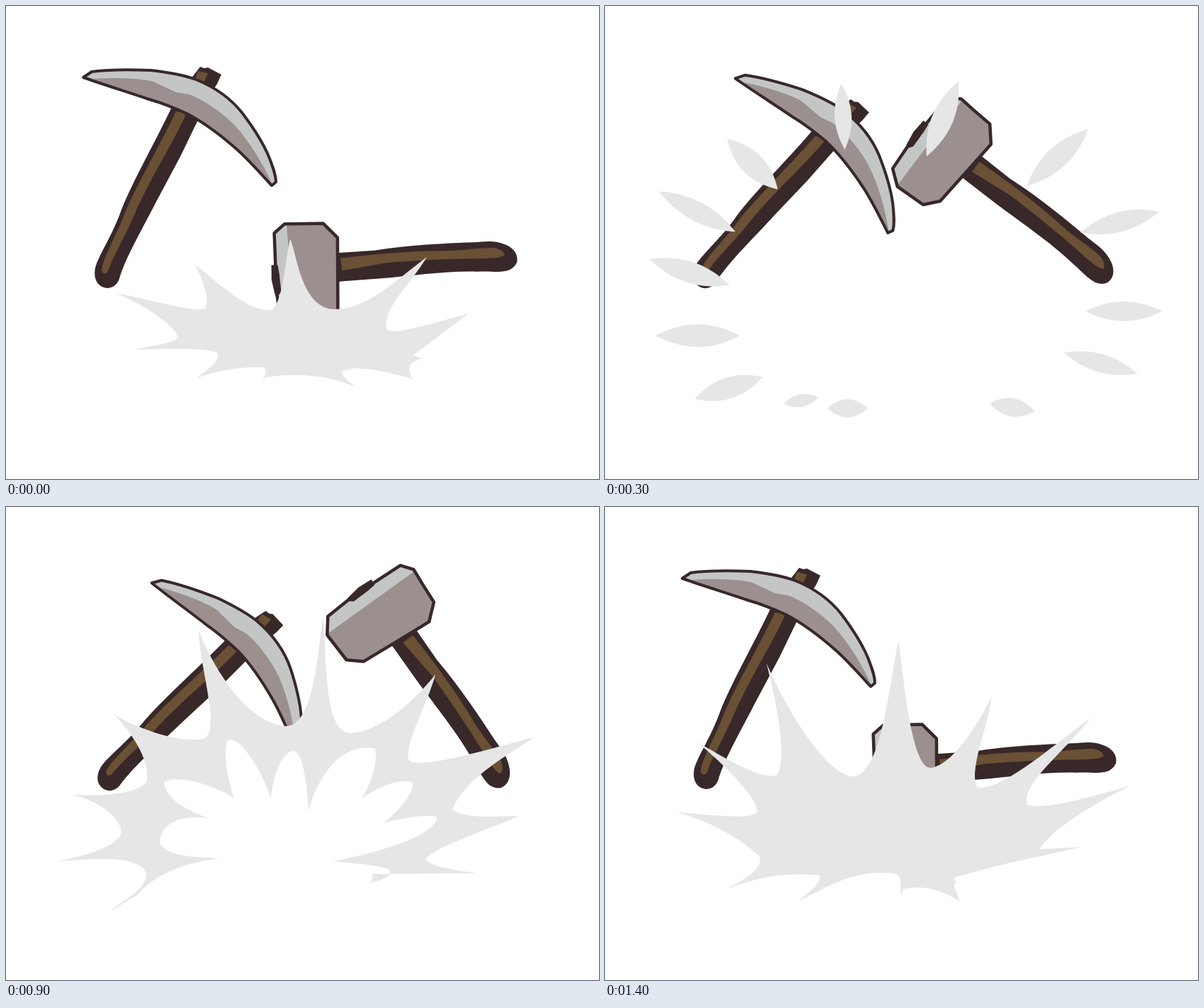
An HTML page with a canvas that plays this animation: 837x669 px, repeating every 1500 ms.

```html
<!DOCTYPE html>
<html lang="en">
<head>
<meta charset="utf-8">
<title>Pickaxe and hammer</title>
<style>
html, body { margin: 0; width: 100%; height: 100%; overflow: hidden; background: #fff; }
canvas { display: block; }
</style>
</head>
<body>
<canvas id="stage" width="837" height="669"></canvas>
<script>
const ctx = document.getElementById('stage').getContext('2d');
const DARK = '#38282a', WOOD = '#6a5034', LIGHT = '#c4c6c6', SHADE = '#9b8f8f', DUST = '#e6e6e6';
const LOOP = 1500, STEP = 100, HALF = 700;
const rad = degrees => degrees * Math.PI / 180;
const shape = d => new Path2D(d);

const pick = {
  handle: shape('M238 134 C215 185 180 245 163 288 C150 325 132 350 126 370 C122 391 134 399 144 399 C154 398 159 391 161 382 C172 350 190 320 213 275 L246 213 L274 155Z'),
  grain: shape('M240 149 L255 151 C236 194 203 244 180 298 C162 338 153 350 144 375 Q139 382 135 375 C136 358 152 332 165 300 C180 260 214 204 240 149Z'),
  knob: shape('M274 86 L280 88 L285 87 L304 97 L298 110 L291 121 L261 103Z'),
  knobGrain: shape('M271 92 L285 95 L278 112 L266 105Z'),
  head: shape('M109 101 L121 93 C150 89 180 90 205 91 C230 94 250 97 268 104 C298 116 320 134 334 152 C352 176 363 194 371 213 C378 231 381 240 381 249 L375 254 C357 234 342 217 325 202 C300 180 280 165 255 152 C235 143 220 137 202 132 C170 121 140 112 109 101Z'),
  shade: shape('M122 103 Q180 100 208 107 L240 122 L258 125 C276 131 305 150 323 169 C345 193 362 222 376 252 C357 234 342 217 325 202 C300 180 280 165 255 152 C235 143 220 137 202 132Z')
};

const hammer = {
  handle: shape('M550 160 L590 233 C612 272 640 316 655 353 C662 367 664 377 673 390 Q680 398 690 398 Q705 394 706 375 C706 356 698 345 690 330 C672 294 650 250 622 208 L590 148Z'),
  grain: shape('M577 178 L592 169 C620 214 642 254 661 295 C673 323 690 345 696 363 Q697 375 692 378 C685 374 681 364 674 350 C658 314 633 266 613 230Z'),
  head: shape('M476 129 L509 108 L546 89 L586 69 L604 77 L614 99 L627 126 L617 153 L580 170 L519 198 L495 193 L472 155Z'),
  light: shape('M476 129 L586 69 L604 77 L602 81 L475 152Z'),
  lug: shape('M507 106 L524 93 L543 84 L547 92 L537 99 L515 112 L508 111Z')
};

const burst = {
  spark: shape('M401 330 C410 344 415 427 463 429 C510 429 550 388 594 355 C568 398 532 426 537 457 C545 466 590 452 653 435 L575 494 L588 499 C563 504 568 518 575 528 C540 518 490 505 474 518 C475 525 485 531 495 540 C460 524 420 518 367 525 L361 531 C369 520 368 510 360 511 C330 510 300 515 270 526 C285 513 304 503 298 490 C280 483 220 485 180 486 C210 480 240 477 243 467 C235 453 210 430 155 406 C210 416 271 436 282 427 C287 410 278 390 267 366 C305 395 340 432 375 430 C392 415 392 370 401 330Z'),
  blast: shape('M414 189 C421 230 431 370 460 369 C490 365 525 310 546 268 C541 310 512 375 526 397 C565 400 640 330 685 299 C655 340 586 392 596 421 C620 430 690 408 740 395 C700 415 636 450 613 484 L672 481 C620 493 550 506 492 525 L496 531 Q490 534 495 541 L501 558 C475 541 447 534 420 541 L418 550 C415 535 422 519 405 518 C355 513 320 533 273 558 C287 545 306 532 303 521 C270 517 220 520 171 541 C198 526 224 512 218 494 C190 468 150 445 102 432 C140 434 208 444 215 431 C217 414 170 365 128 331 C180 362 225 387 243 379 C257 355 245 290 228 221 C255 285 310 375 348 381 C389 384 400 260 414 189Z'),
  ring: shape('M447 155 C454 205 446 320 487 320 C530 316 575 276 606 237 C595 280 561 335 569 359 C590 371 690 340 747 325 C700 355 645 388 630 428 C650 442 690 437 724 437 C680 457 600 482 592 499 C605 511 640 514 665 518 L517 519 L517 529 L512 532 C530 528 547 523 541 513 C520 505 490 504 462 501 C520 490 610 465 608 438 C590 435 560 440 533 447 C560 425 578 400 573 389 C550 384 525 397 502 412 C520 385 524 355 521 342 C475 331 440 380 427 430 C425 395 420 347 406 345 C388 346 376 385 374 413 C367 385 330 318 312 331 C307 355 313 385 322 412 C295 393 237 377 223 390 C226 413 255 430 287 440 C240 434 217 452 217 475 C225 495 270 495 301 497 C260 502 214 515 186 548 L147 572 C165 555 203 540 197 515 C180 491 120 498 73 501 C110 494 160 480 163 460 C160 434 125 415 95 407 C130 409 190 407 199 387 C203 355 175 317 152 293 C195 319 260 337 282 326 C302 310 272 220 272 174 C295 235 345 308 396 310 C433 308 440 215 447 155Z')
};

// x, y, half length, half width, tilt
const petals = [
  [311, 85, 26, 12, -93], [491, 89, 32, 15, -67], [699, 159, 33, 15, -43],
  [147, 171, 28, 16, 45], [47, 257, 34, 14, 28], [33, 367, 33, 15, 18],
  [48, 482, 33, 16, 0], [104, 577, 28, 15, -18], [235, 600, 14, 9, -10],
  [319, 614, 16, 13, 0], [617, 612, 18, 13, 10], [777, 532, 30, 13, 16],
  [819, 438, 30, 14, 0], [812, 276, 32, 14, -15]
];

// time, rotation, x and y of the grip
const swing = [
  [0, 0, 142, 380], [200, 7.5, 138, 380], [500, 31.5, 147, 380], [700, 49.7, 157, 373],
  [900, 19, 146, 382], [1200, 6.5, 127, 379], [1400, 0, 142, 380]
];

function fill(path, color) {
  ctx.fillStyle = color;
  ctx.fill(path);
}

function outline(path, width) {
  ctx.lineWidth = width;
  ctx.strokeStyle = DARK;
  ctx.stroke(path);
}

function drawPick(t) {
  const i = Math.max(1, swing.findIndex(key => key[0] >= t));
  const a = swing[i - 1], b = swing[i];
  const u = (t - a[0]) / (b[0] - a[0]);
  const [, angle, x, y] = a.map((v, n) => v + (b[n] - v) * u);
  ctx.save();
  ctx.translate(x, y);
  ctx.rotate(rad(angle));
  ctx.translate(-142, -380);
  fill(pick.handle, DARK);
  fill(pick.grain, WOOD);
  fill(pick.knob, DARK);
  fill(pick.knobGrain, WOOD);
  fill(pick.head, LIGHT);
  fill(pick.shade, SHADE);
  outline(pick.head, 4);
  ctx.restore();
}

function drawHammer(t) {
  const lift = 1 - Math.abs(1 - t / HALF) ** 1.83;
  const drift = 4 * Math.abs(Math.sin(Math.PI * t / HALF));
  ctx.save();
  ctx.translate(678 + drift, 356 + drift / 3);
  ctx.rotate(rad(-65.6 * (1 - lift)));
  ctx.translate(-678, -356);
  fill(hammer.handle, DARK);
  fill(hammer.grain, WOOD);
  fill(hammer.head, SHADE);
  fill(hammer.light, LIGHT);
  outline(hammer.head, 4.5);
  fill(hammer.lug, DARK);
  ctx.restore();
}

function drawPetals(spread, stretch, pointed) {
  ctx.fillStyle = DUST;
  for (const [x, y, length, width, tilt] of petals) {
    const l = length * stretch;
    ctx.save();
    ctx.translate(425 + (x - 425) * spread, 410 + (y - 410) * spread);
    ctx.rotate(rad(tilt));
    ctx.beginPath();
    if (pointed) {
      ctx.moveTo(-l, 0);
      ctx.quadraticCurveTo(0, -width * 2, l, 0);
      ctx.quadraticCurveTo(0, width * 2, -l, 0);
    } else {
      ctx.ellipse(0, 0, l, width, 0, 0, 2 * Math.PI);
    }
    ctx.fill();
    ctx.restore();
  }
}

const dust = [
  () => fill(burst.spark, DUST),
  () => fill(burst.blast, DUST),
  () => fill(burst.ring, DUST),
  () => drawPetals(0.78, 1.8, true),
  () => drawPetals(0.9, 1.3, true),
  () => drawPetals(1, 1, false)
];

function drawDust(t) {
  const beat = t / STEP;
  if (beat < 5) dust[beat]();
  else if (beat >= 7) dust[(beat - 7) % dust.length]();
}

function frame() {
  const t = Math.floor((performance.now() - start) % LOOP / STEP) * STEP;
  ctx.fillStyle = '#fff';
  ctx.fillRect(0, 0, 837, 669);
  drawHammer(t);
  drawPick(t);
  drawDust(t);
  requestAnimationFrame(frame);
}

ctx.lineJoin = 'round';
const start = performance.now();
frame();
</script>
</body>
</html>
```
